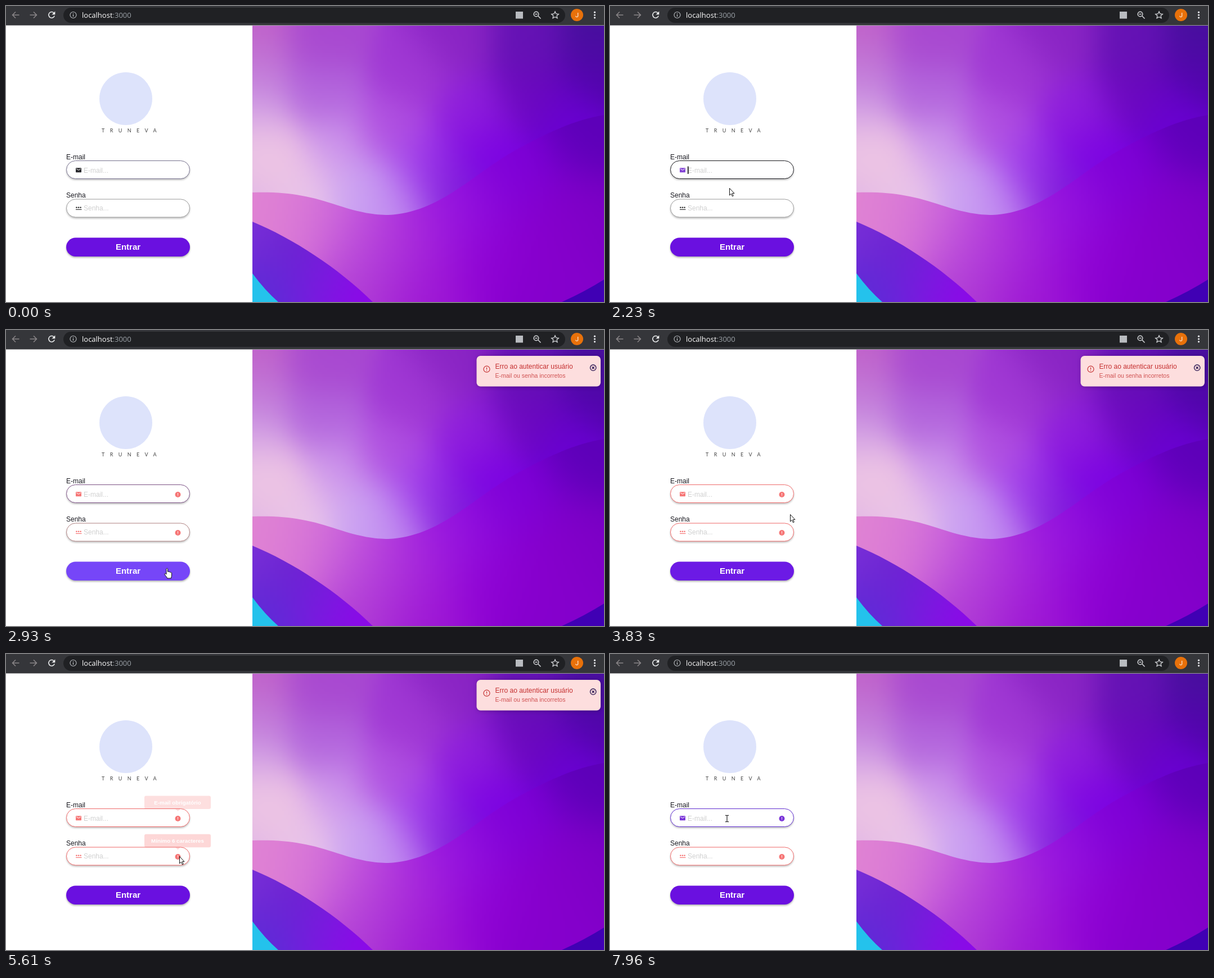
An HTML page with a canvas that plays this animation: 1063 by 527 pixels, repeating every 8000 ms.

```html
<!DOCTYPE html>
<html lang="pt">
<head>
<meta charset="utf-8">
<title>Login</title>
<style>
html, body { margin: 0; width: 100%; height: 100%; overflow: hidden; background: #fff; }
canvas, svg { position: absolute; left: 0; top: 0; display: block; }
text { font-family: "Liberation Sans", Arial, sans-serif; font-size: 12px; }
.line { fill: none; stroke-width: 1.5; }
.hint { fill: #d0d0d0; }
.box { fill: #fff; filter: drop-shadow(0 2px 1.5px rgba(0, 0, 0, .25)); }
.tip text { font-size: 9.75px; font-weight: bold; fill: #fff; text-anchor: middle; }
.tip { fill: #f87272; }

.anim { animation: 8s linear infinite; }
.step { animation-timing-function: step-end; }

#cursor { animation-name: move; }
@keyframes move {
  0% { transform: translate(-50px, -50px); animation-timing-function: step-end; }
  .875% { transform: translate(820px, 497px); animation-timing-function: steps(5); }
  5.125% { transform: translate(500px, 390px); animation-timing-function: steps(6); }
  10.25% { transform: translate(208px, 293px); animation-timing-function: step-end; }
  27.875% { transform: translate(212px, 324px); animation-timing-function: steps(7); }
  34% { transform: translate(287px, 424px); }
  44.375% { transform: translate(287px, 424px); animation-timing-function: steps(4); }
  47.875% { transform: translate(320px, 328px); animation-timing-function: steps(3); }
  50.5% { transform: translate(305px, 291px); }
  64% { transform: translate(305px, 291px); animation-timing-function: steps(5); }
  68.375% { transform: translate(308px, 360px); }
  81.75% { transform: translate(308px, 360px); animation-timing-function: steps(4); }
  85.25% { transform: translate(213px, 306px); }
  86.875% { transform: translate(213px, 306px); animation-timing-function: steps(3); }
  89.5%, 100% { transform: translate(208px, 293px); }
}
#arrow { animation-name: arrow; }
@keyframes arrow {
  0%, 27.875%, 45.25% { opacity: 1; }
  10.25%, 34%, 88.625%, 100% { opacity: 0; }
}
#beam { animation-name: beam; }
@keyframes beam {
  0%, 27.875% { opacity: 0; }
  10.25%, 88.625%, 100% { opacity: 1; }
}
#hand { animation-name: hand; }
@keyframes hand {
  0%, 45.25%, 100% { opacity: 0; }
  34% { opacity: 1; }
}
#caret { animation-name: caret; }
@keyframes caret {
  0%, 21.25%, 34.5%, 97%, 100% { opacity: 0; }
  14.625%, 27.875%, 90.375% { opacity: 1; }
}
#toast, .warn { animation-name: alert; }
@keyframes alert {
  0%, 100% { opacity: 0; }
  36.6% { opacity: 1; }
}
#toast { animation-name: toast; }
@keyframes toast {
  0%, 99.5%, 100% { opacity: 0; }
  36.6% { opacity: 1; }
}
#mailBox { animation-name: mailBox; }
@keyframes mailBox {
  0%, 8.75% { stroke: #77728f; }
  10.25%, 12% { stroke: #56507a; }
  15.5%, 35.75% { stroke: #17171c; }
  36.6% { stroke: #7a4f86; }
  38.375%, 90.375% { stroke: #f06a6a; }
  94.5%, 100% { stroke: #5f2cd0; }
}
#passBox { animation-name: passBox; }
@keyframes passBox {
  0%, 35.75% { stroke: #9c9c9c; }
  36.6% { stroke: #b08585; }
  38.375%, 100% { stroke: #f06a6a; }
}
#mailIcon { animation-name: mailIcon; }
@keyframes mailIcon {
  0%, 12.9% { fill: #29292d; }
  15.5%, 36.59% { fill: #8344d4; }
  36.6%, 90.375% { fill: #f67676; }
  92.5%, 100% { fill: #7a35d8; }
}
#passIcon { animation-name: passIcon; }
@keyframes passIcon {
  0% { fill: #333; }
  36.6%, 100% { fill: #f67676; }
}
#mailDot { animation-name: mailDot; }
@keyframes mailDot {
  0%, 90.375% { fill: #f67676; }
  92.5%, 100% { fill: #7a35d8; }
}
#button { animation-name: button; }
@keyframes button {
  0%, 34%, 48.5%, 100% { fill: #6a10e0; }
  36%, 45.25% { fill: #7646f8; }
}
#mailTip { animation-name: mailTip; }
@keyframes mailTip {
  0%, 50.5%, 71.5%, 100% { opacity: 0; }
  55.75%, 65.5% { opacity: 1; }
}
#passTip { animation-name: passTip; }
@keyframes passTip {
  0%, 68.5%, 85.25%, 100% { opacity: 0; }
  74.375%, 82.625% { opacity: 1; }
}
</style>
</head>
<body>
<canvas id="wall" width="1063" height="527"></canvas>
<svg width="1063" height="527" viewBox="0 0 1063 527">
  <!-- browser bar -->
  <rect width="1063" height="34.5" fill="#35363a"/>
  <rect x="102" y="3" width="892" height="27" rx="13.5" fill="#202124"/>
  <g class="line" stroke="#8b8789">
    <path d="M23.5 16H12M17 10.5 11.5 16 17 21.5"/>
    <path d="M42.500 16H54M49 10.500 54.500 16 49 21.500"/>
  </g>
  <path class="line" stroke="#f1f3f4" stroke-width="1.8" d="M85 12.200A5.300 5.300 0 1 0 86.200 17.500"/>
  <path fill="#f1f3f4" d="M87.300 9.500V15.200H81.600Z"/>
  <circle class="line" cx="119.500" cy="16" r="5.500" stroke="#b4b7bb" style="stroke-width:1.200"/>
  <path fill="#b4b7bb" d="M118.800 15h1.400v4h-1.400zM118.800 12.700h1.400v1.400h-1.400z"/>
  <text x="135" y="21" style="font:13px 'Open Sans', sans-serif" fill="#fff">localhost<tspan fill="#9aa0a6">:3000</tspan></text>
  <rect x="906" y="10" width="13" height="12.500" fill="#b9bcc0"/>
  <g class="line" stroke="#d4d6d9">
    <circle cx="942.500" cy="14.500" r="4.300"/>
    <path d="M945.800 17.800 950.500 22.500M940.300 14.500h4.400"/>
    <path style="stroke-width:1.300" d="M976 9.800 977.900 14 982.300 14.400 979 17.400 980 21.800 976 19.500 972 21.800 973 17.400 969.700 14.400 974.100 14Z"/>
  </g>
  <circle cx="1015" cy="16" r="11" fill="#e8710a"/>
  <text x="1015" y="20" text-anchor="middle" style="font:11px Roboto, sans-serif" fill="#fff">J</text>
  <g fill="#e8eaed"><circle cx="1046.500" cy="11.200" r="1.600"/><circle cx="1046.500" cy="16" r="1.600"/><circle cx="1046.500" cy="20.800" r="1.600"/></g>

  <!-- brand -->
  <circle cx="213" cy="165" r="47" fill="#dde3fb"/>
  <text x="170" y="224.500" style="font:9px Lato, sans-serif;letter-spacing:9.400px" fill="#444">TRUNEVA</text>

  <!-- form -->
  <text x="107" y="273" fill="#1b1b22">E-mail</text>
  <rect id="mailBox" class="box anim" x="107.500" y="275.500" width="219" height="32" rx="16"/>
  <path id="mailIcon" class="anim" transform="translate(123 286.300) scale(.5)" d="M20 4H4c-1.100 0-2 .9-2 2v12c0 1.100.9 2 2 2h16c1.100 0 2-.9 2-2V6c0-1.100-.9-2-2-2zm0 4l-8 5-8-5V6l8 5 8-5z"/>
  <text class="hint" x="138" y="296.500">E-mail...</text>
  <rect id="caret" class="anim step" x="138" y="285.500" width="1.500" height="13.500"/>

  <text x="107" y="341" fill="#1b1b22">Senha</text>
  <rect id="passBox" class="box anim" x="107.500" y="344" width="219" height="32" rx="16"/>
  <g id="passIcon" class="anim step">
    <circle cx="125.400" cy="358.700" r="1.300"/><circle cx="129" cy="358.700" r="1.300"/><circle cx="132.600" cy="358.700" r="1.300"/>
    <rect x="124" y="361.800" width="10.500" height="1.200"/>
  </g>
  <text class="hint" x="138" y="364.300">Senha...</text>

  <g class="warn anim step">
    <circle id="mailDot" class="anim" cx="305.500" cy="293" r="5"/>
    <path fill="#fff" d="M305 290.500h1v3h-1zM305 294.500h1v1h-1z"/>
  </g>
  <g class="warn anim step">
    <circle cx="305.500" cy="361" r="5" fill="#f67676"/>
    <path fill="#fff" d="M305 358.500h1v3h-1zM305 362.500h1v1h-1z"/>
  </g>

  <rect id="button" class="anim" x="107" y="412.500" width="220" height="33.500" rx="16.750" style="filter:drop-shadow(0 2px 1.500px rgba(0,0,0,.3))"/>
  <text x="217" y="433.500" text-anchor="middle" style="font-size:15px;font-weight:bold" fill="#fff">Entrar</text>

  <!-- tooltips -->
  <g id="mailTip" class="tip anim">
    <path d="M249 252.500H361a3 3 0 0 1 3 3V273a3 3 0 0 1-3 3H310L305.500 280 301 276H249a3 3 0 0 1-3-3V255.500a3 3 0 0 1 3-3Z"/>
    <text x="305" y="267.500">E-mail obrigatório</text>
  </g>
  <g id="passTip" class="tip anim">
    <path d="M249 320.800H361a3 3 0 0 1 3 3V341.300a3 3 0 0 1-3 3H310L305.500 348.300 301 344.300H249a3 3 0 0 1-3-3V323.800a3 3 0 0 1 3-3Z"/>
    <text x="305" y="335.700">Mínimo 6 caracteres</text>
  </g>

  <!-- toast -->
  <g id="toast" class="anim step">
    <rect x="836.500" y="46" width="220.500" height="54.500" rx="7" fill="#fddede" style="filter:drop-shadow(1px 1px 3px rgba(0,0,0,.25))"/>
    <circle class="line" cx="854.500" cy="69.700" r="5.500" stroke="#c53030" style="stroke-width:1.200"/>
    <path fill="#c53030" d="M853.900 66.500h1.200v3.800h-1.200zM853.900 71.500h1.200v1.200h-1.200z"/>
    <text x="869.500" y="69" fill="#c53030">Erro ao autenticar usuário</text>
    <text x="869.500" y="84.500" style="font-size:10.500px" fill="#d05252">E-mail ou senha incorretos</text>
    <g class="line" stroke="#24104e" style="stroke-width:1.300"><circle cx="1043.700" cy="67.200" r="5.200"/><path d="M1041.700 65.200l4 4m0-4l-4 4"/></g>
  </g>

  <!-- pointer -->
  <g id="cursor" class="anim">
    <path id="arrow" class="anim step" fill="#fff" stroke="#111" d="M.5.500V13L3.400 10.300 5.400 14.800 7.300 14 5.300 9.600H9Z"/>
    <path id="beam" class="anim step" fill="none" stroke="#222" stroke-width="1.200" d="M-3-5.700h2L0-5 1-5.700H3M0-5V5M-3 5.700h2L0 5 1 5.700H3"/>
    <path id="hand" class="anim step" fill="#fff" stroke="#111" d="M-2 1.500C-2 0 .5 0 .5 1.500V6.500C1 5.600 3 5.800 3 7 3.500 6.300 5.300 6.600 5.300 7.800 6 7.200 7.500 7.600 7.500 9V13C7.500 15 6.500 16 6.500 18H-.5C-.5 16-3.500 14-5 11-5.600 9.600-4 8.600-2 11Z"/>
  </g>
</svg>
<script>
const ctx = document.getElementById('wall').getContext('2d');
const left = 438, top0 = 35, cell = 4, cols = 157, rows = 123;

// Smooth colour field: every "x,y,colour" point weighs in by distance.
function field(list, spread) {
  const pts = list.trim().split(/\s+/).map(p => {
    const [x, y, c] = p.split(',');
    const n = parseInt(c, 16);
    return [+x, +y, n >> 16, n >> 8 & 255, n & 255];
  });
  const tile = document.createElement('canvas');
  tile.width = cols;
  tile.height = rows;
  const g = tile.getContext('2d'), img = g.createImageData(cols, rows);
  for (let i = 0; i < cols * rows; i++) {
    const px = left + (i % cols + .5) * cell;
    const py = top0 + (Math.floor(i / cols) + .5) * cell;
    let sum = 1e-30, rgb = [0, 0, 0];
    for (const [x, y, ...c] of pts) {
      const w = Math.exp(-((x - px) ** 2 + (y - py) ** 2) / (2 * spread * spread));
      sum += w;
      rgb = rgb.map((v, k) => v + w * c[k]);
    }
    img.data.set([...rgb.map(v => v / sum), 255], i * 4);
  }
  g.putImageData(img, 0, 0);
  return tile;
}

function paint(path, tile) {
  ctx.save();
  ctx.clip(new Path2D(path));
  ctx.imageSmoothingQuality = 'high';
  ctx.drawImage(tile, left, top0, cols * cell, rows * cell);
  ctx.restore();
}

function fill(path, colour) {
  ctx.fillStyle = colour;
  ctx.fill(new Path2D(path));
}

paint('M438 34H1063V527H438Z', field(`
  438,35,c060c8 438,110,c27ad8 438,190,cc98e4 438,250,f0cce8 470,280,f4cade
  520,325,eac6ea 438,325,dcb0e6 560,60,a848d0 560,160,b264dc 580,250,ce98ec
  640,330,ceaaf2 690,350,c088f0 680,220,b050e0 720,120,a038d4 740,290,a038ec
  790,320,7c18d8 800,60,8a24c4 830,190,9020dc 860,260,7c00e4 930,60,6412b4
  930,160,6a08bc 1055,45,46109c 1050,120,5204ac 1000,210,6a00d4`, 45));
paint('M438 332C500 330 540 338 590 355C630 368 655 372 680 372C770 368 830 300 900 260C960 226 1010 203 1063 194V527H438Z', field(`
  438,350,e086d2 500,380,e07ed4 560,380,d070da 640,400,be4ede 720,410,a828dc
  640,480,b040d4 740,500,9c14d4 800,360,9414e0 860,450,8e00d4 900,300,7e00d8
  980,400,8800cc 1050,230,5c00b8 1050,380,7a00c4 960,500,8400cc`, 60));
paint('M438 384C510 414 590 466 652 527H438Z', field(`
  438,400,7a30d8 500,440,6c22d0 560,490,7c18e0 640,525,8c08e8 470,500,5c2cd8`, 45));
fill('M438 476Q460 506 484 527H438Z', '#24c2ec');
fill('M988 527Q1030 508 1063 487V527Z', '#4000b4');
</script>
</body>
</html>
```
